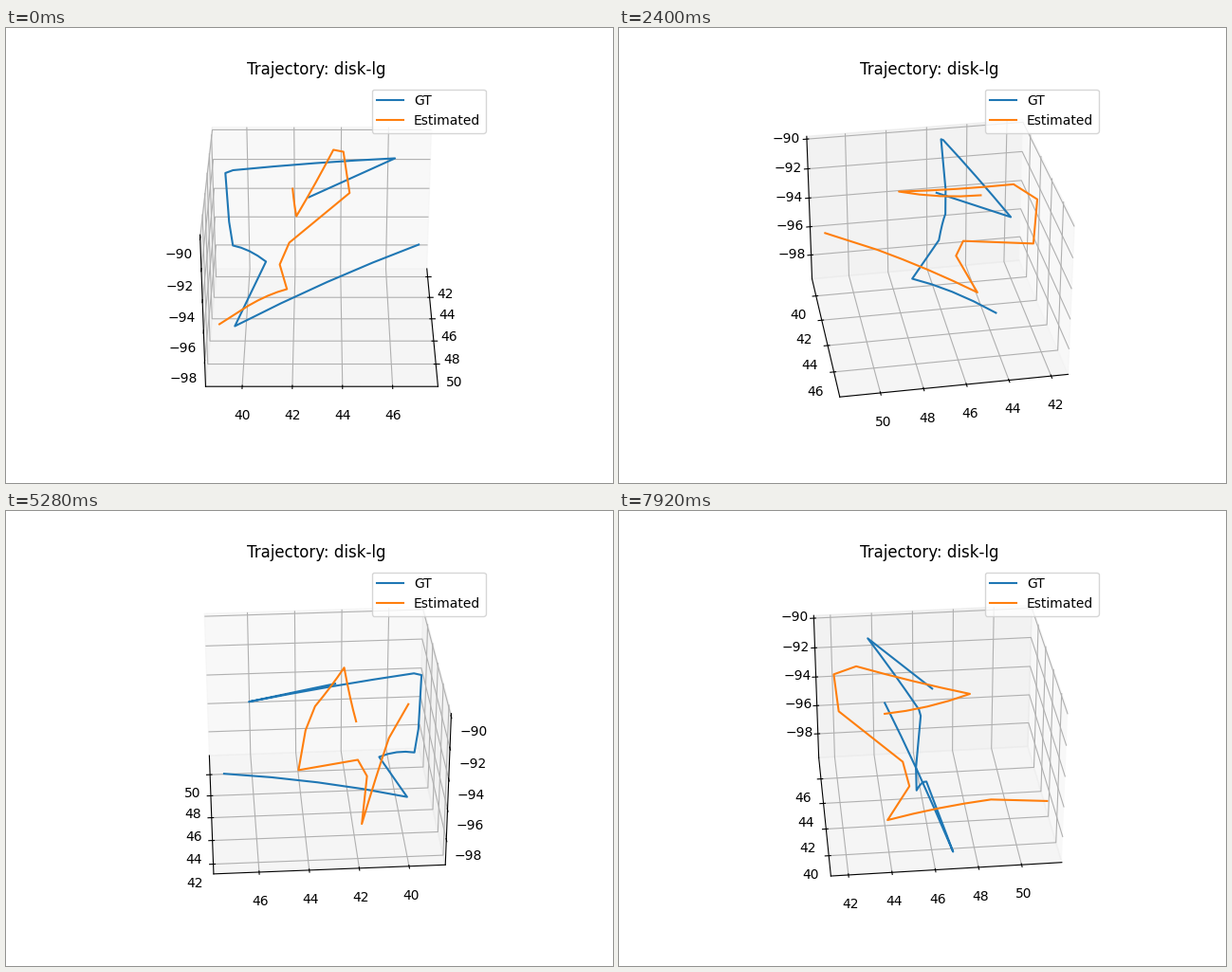
A matplotlib script for the animation above (8000 ms loop, 640x480 px).

```python
import matplotlib.pyplot as plt
import numpy as np
from matplotlib.animation import FuncAnimation

FRAMES = 67
LOOP_MS = 8000
STEP_DEG = 4

# Axis limits (x, y, z) and the drawn edge lengths of the box
LOW = np.array([41.195, 38.54, -99.72])
HIGH = np.array([51.875, 47.81, -89.82])
EDGES = np.array([1.1905, 1.1905, 0.8929])

# Turning points as offsets from the box centre, each with the
# vertical bow of the leg that leads to it
GT = [
    (-.223, .523, -.076, 0), (.046, -.467, -.427, .02),
    (-.075, -.298, -.096, 0), (-.143, -.476, -.036, .015),
    (-.147, -.493, .107, 0), (-.123, -.504, .412, 0),
    (-.128, -.464, .426, 0), (-.319, .389, .398, .006),
    (-.021, -.068, .323, 0),
]
ESTIMATED = [
    (.521, -.519, -.116, 0), (.251, -.384, -.173, 0),
    (-.271, -.192, -.386, .01), (-.157, -.227, -.162, 0),
    (-.186, -.175, -.043, 0), (-.496, .152, .094, 0),
    (-.518, .117, .336, 0), (-.403, .062, .406, 0),
    (.168, -.130, .315, -.006), (-.275, -.156, .238, -.016),
]


def bowed_path(keys, steps=4):
    keys = np.array(keys)
    t = np.linspace(0, 1, steps + 1)[:, None]
    up = np.array([0, 0, 1])
    legs = [a[:3] + (b[:3] - a[:3]) * t + 4 * b[3] * t * (1 - t) * up
            for a, b in zip(keys, keys[1:])]
    return np.concatenate(legs)


def to_data(points):
    return (LOW + HIGH) / 2 + points / EDGES * (HIGH - LOW)


fig = plt.figure(figsize=(6.4, 4.8), dpi=100)
ax = fig.add_subplot(projection="3d")
for keys, label in ((GT, "GT"), (ESTIMATED, "Estimated")):
    ax.plot(*to_data(bowed_path(keys)).T, label=label)

ax.set_xticks(range(42, 51, 2))
ax.set_yticks(range(40, 47, 2))
ax.set_zticks(range(-98, -89, 2))
ax.set_xlim(LOW[0], HIGH[0])
ax.set_ylim(LOW[1], HIGH[1])
ax.set_zlim(LOW[2], HIGH[2])
ax.set_title("Trajectory: disk-lg", x=0.4975)
ax.legend(loc="upper right")


def update(i):
    # A tiny offset at zero keeps the choice of back panes stable
    ax.view_init(elev=30, azim=max(STEP_DEG * i, 0.01))
    return ax.lines


anim = FuncAnimation(fig, update, frames=FRAMES, interval=LOOP_MS / FRAMES,
                     repeat=True, repeat_delay=0, blit=False)
plt.show()
```
